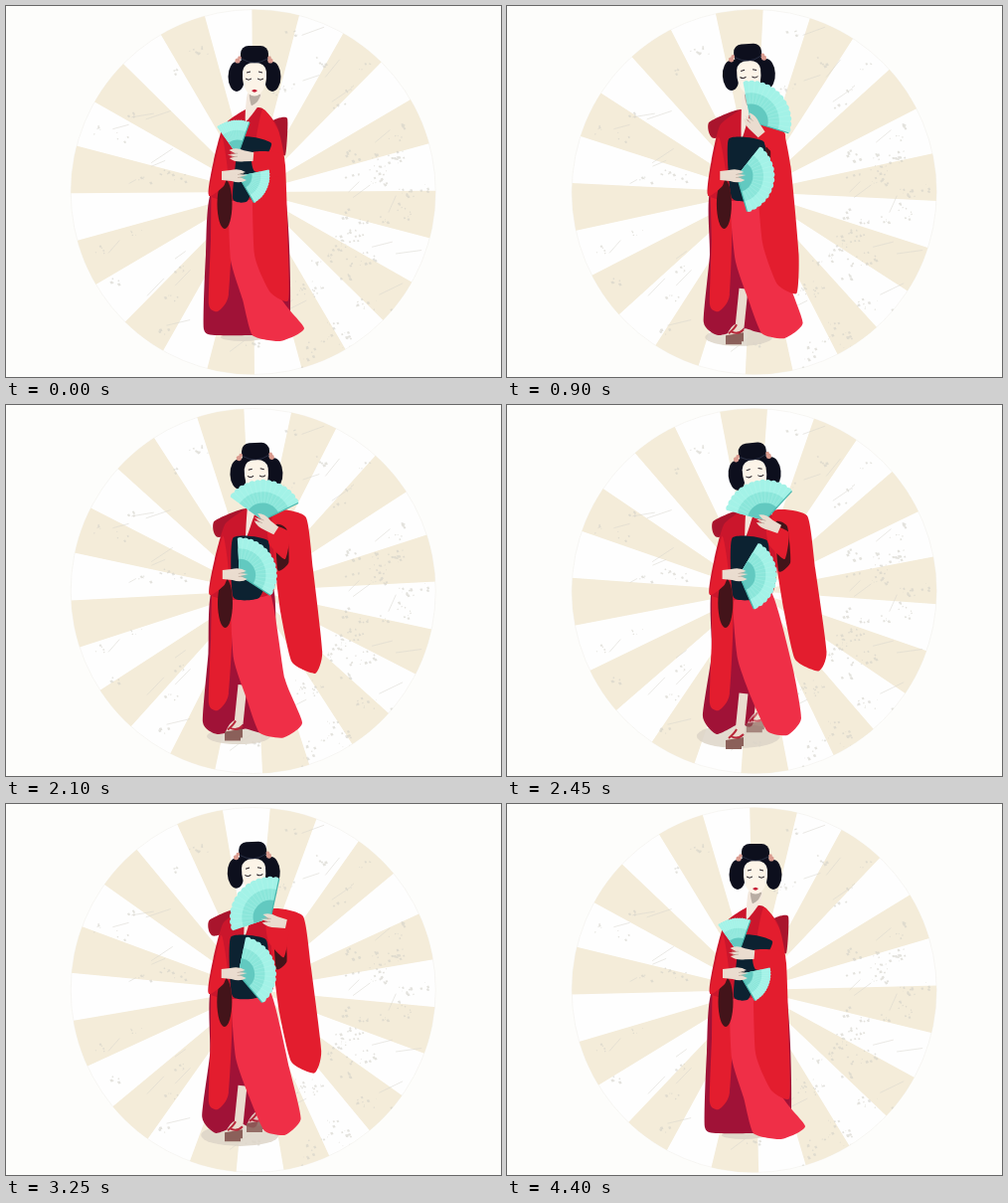
Animation, 498 px wide and 373 px high, one loop 4.45 s. Source, as an HTML page:

```html
<!DOCTYPE html>
<html lang="en">
<head>
<meta charset="utf-8">
<title>Fan dance</title>
<style>
  html, body { margin: 0; width: 100%; height: 100%; overflow: hidden; background: #fdfdfb; }
  svg { display: block; width: 100vw; height: 100vh; }
</style>
</head>
<body>
<svg viewBox="0 0 498 373">
  <defs>
    <clipPath id="disc"><circle cx="248.7" cy="187" r="183.5"/></clipPath>
  </defs>
  <circle cx="248.7" cy="187" r="183.5" fill="#fefefe" stroke="#f5f4f0" stroke-width=".8"/>
  <g clip-path="url(#disc)">
    <path id="rays" fill="#f4ecd9"/>
    <g id="wear"></g>
  </g>
  <g id="figure"></g>
</svg>
<script>
const LOOP = 4450, STEP = 50;
const CX = 248.7, CY = 187;
const RED = '#e31d2e', PINK = '#ef2f47', CRIMSON = '#a01237', WINE = '#a9152d';
const BROWN = '#43141a', NAVY = '#0c2231', SKIN = '#eadccf', HAIR = '#0d0f1d';

// The whole dance is steered by seven controls that pass through a few key poses.
const KEY_TIMES = [0, 900, 1500, 2100, 2800, 3750, 4400];
const CONTROLS = {
  lean: [0, -7, 9, 2, -3, 2, 0],
  open: [0, 1, 1, 1, 1, 1, 0],
  spread: [0, .25, .4, .9, 1, .65, 0],
  leftStep: [0, .6, 0, .5, 1, 0, 0],
  rightStep: [0, 0, 1, 0, .5, 0, 0],
  upperTilt: [-98, -42, -77, -85, -127, -142, -98],
  lowerTilt: [24, 11, -25, -30, 30, -63, 24]
};

const clamp = v => Math.max(0, Math.min(1, v));
const mix = (a, b, u) => a + (b - a) * u;
const num = v => v.toFixed(1);
const polar = (x, y, r, a) => [x + r * Math.cos(a), y + r * Math.sin(a)].map(num);

function follow(keys, t) {
  const last = KEY_TIMES.length - 1, time = Math.min(t, KEY_TIMES[last]);
  let k = 0;
  while (k < last - 1 && time >= KEY_TIMES[k + 1]) k++;
  const span = KEY_TIMES[k + 1] - KEY_TIMES[k];
  const u = (time - KEY_TIMES[k]) / span, ease = u * u * (3 - 2 * u);
  const slope = i => i === 0 || i === last ? 0 :
    .7 * (keys[i + 1] - keys[i - 1]) / (KEY_TIMES[i + 1] - KEY_TIMES[i - 1]);
  return mix(keys[k], keys[k + 1], ease) +
    span * u * (1 - u) * (slope(k) * (1 - u) - slope(k + 1) * u);
}

function poseAt(t) {
  const pose = {};
  for (const name in CONTROLS) pose[name] = follow(CONTROLS[name], t);
  pose.step = clamp(pose.leftStep + pose.rightStep);
  return pose;
}

// The body bends from the hips: the higher a point, the more it leans.
const sway = (x, y, pose) => x + pose.lean * clamp((240 - y) / 180);

const figure = document.getElementById('figure');
const updates = [];

function add(parent, tag, attrs, html = '') {
  const el = document.createElementNS('http://www.w3.org/2000/svg', tag);
  for (const name in attrs) el.setAttribute(name, attrs[name]);
  el.innerHTML = html;
  parent.appendChild(el);
  return el;
}

function smoothPath(points, bend = .09) {
  const at = i => points[(i + points.length) % points.length];
  let d = `M${points[0].map(num)}`;
  points.forEach((a, i) => {
    const p = at(i - 1), b = at(i + 1), q = at(i + 2);
    const c = a.map((v, j) => v + (b[j] - p[j]) * bend);
    const e = b.map((v, j) => v - (q[j] - a[j]) * bend);
    d += `C${[...c, ...e, ...b].map(num)}`;
  });
  return d + 'Z';
}

// An outline at rest that a control pulls towards its moved form.
function cloth(fill, control, rest, moved = rest) {
  const parse = s => s.split(' ').map(p => p.split(',').map(Number));
  const from = parse(rest), to = parse(moved), el = add(figure, 'path', { fill });
  updates.push(pose => el.setAttribute('d', smoothPath(from.map(([x, y], i) => {
    const px = mix(x, to[i][0], pose[control]), py = mix(y, to[i][1], pose[control]);
    return [sway(px, py, pose), py];
  }))));
}

function rigid(html, place) {
  const el = add(figure, 'g', {}, html);
  updates.push(pose => {
    const { x, y, turn = 0, alpha = 1 } = place(pose);
    el.setAttribute('transform', `translate(${num(sway(x, y, pose))} ${num(y)}) rotate(${num(turn)})`);
    el.setAttribute('opacity', clamp(alpha));
  });
}

function sector(x, y, r, from, to, bumps = 1) {
  const step = (to - from) / bumps, bow = bumps > 1 ? Math.abs(r * step) * .75 : r;
  let d = `M${num(x)},${num(y)}L${polar(x, y, r, from)}`;
  for (let i = 1; i <= bumps; i++) d += `A${num(bow)},${num(bow)} 0 0 1 ${polar(x, y, r, from + step * i)}`;
  return d + 'Z';
}

function fan(place) {
  const leaf = add(figure, 'path', { fill: '#a3f2e7' });
  const tint = add(figure, 'path', { fill: '#8be6da' });
  const core = add(figure, 'path', { fill: '#62c9c0' });
  const ribs = add(figure, 'path', { stroke: '#c9f9f2', 'stroke-width': .4, opacity: .5 });
  const guard = add(figure, 'path', { stroke: '#48b5ac', 'stroke-width': 1.2 });
  updates.push(pose => {
    const { x: px, y, r, tilt, span } = place(pose), x = sway(px, y, pose);
    const from = (tilt - span / 2) * Math.PI / 180, to = (tilt + span / 2) * Math.PI / 180;
    leaf.setAttribute('d', sector(x, y, r, from, to, 14));
    tint.setAttribute('d', sector(x, y, r * .72, from, to));
    core.setAttribute('d', sector(x, y, r * .44, from, to));
    let d = '';
    for (let i = 1; i < 14; i++) {
      const a = mix(from, to, i / 14);
      d += `M${polar(x, y, r * .45, a)}L${polar(x, y, r, a)}`;
    }
    ribs.setAttribute('d', d);
    guard.setAttribute('d', `M${num(x)},${num(y)}L${polar(x, y, r, to)}`);
  });
}

// Ground shadow
const shadow = add(figure, 'ellipse', { cy: 333, fill: '#ddd5c8', opacity: .85 });
updates.push(({ leftStep, rightStep, step }) => {
  shadow.setAttribute('cx', num(238 - 8 * leftStep + 6 * rightStep));
  shadow.setAttribute('rx', num(22 + 20 * step));
  shadow.setAttribute('ry', num(4 + 8 * step));
});

// Bow, then skirt lining
cloth(WINE, 'open', '268,116 283,113 281,150 270,140', '208,117 240,104 276,115 213,133');
cloth(CRIMSON, 'step',
  '208,185 201,250 199,325 214,331 247,331 285,330 279,185',
  '207,185 206,250 197,313 211,331 234,320 248,318 258,185');

const foot = `
  <path d="M5,-5L9,-44" stroke="${SKIN}" stroke-width="9"/>
  <path d="M-8,3Q-4,-7 2,-9L9,-5Q6,3 -8,4Z" fill="${SKIN}"/>
  <path d="M-9,3L9,0V9H7V12H-9Z" fill="#8b605a"/>
  <path d="M-6,1Q0,-4 2,-8M-4,-1Q3,3 9,-3" fill="none" stroke="#b8283a" stroke-width="2"/>`;
rigid(foot, ({ rightStep: s }) => ({ x: 246 + 17 * s, y: 314 + 14 * s, alpha: 3 * s }));
rigid(foot, ({ leftStep: s }) => ({ x: 229, y: 312 + 27 * s, alpha: 3 * s }));

// Left robe panel, front panel, bodice, right sleeve
cloth(RED, 'step', '208,165 206,235 204,300 213,307 224,290 228,190');
cloth(PINK, 'step',
  '226,190 226,255 238,295 248,331 276,337 300,324 274,288 264,190',
  '229,195 232,255 246,295 262,328 282,332 296,315 287,262 266,188');
cloth('#cb162c', 'open', '241,104 219,120 209,155 204,190 229,196 268,188 274,125 258,103');
cloth(RED, 'spread',
  '258,104 274,125 281,160 284,250 284,296 266,288 250,250 248,160',
  '268,107 303,111 311,165 322,248 314,267 290,255 279,205 272,160');

// Neck, obi, sleeve linings, forearms
cloth('#f3e8dd', 'open', '243,88 257,88 254,100 241,116', '243,88 257,88 248,112 240,134');
cloth('#b9aea4', 'open', '245,89 256,89 253,96 247,100');
cloth(NAVY, 'open',
  '236,133 267,138 255,165 243,196 228,193',
  '227,134 262,136 264,168 254,194 228,193');
cloth(BROWN, 'spread', '262,150 264,152 262,158 260,156', '271,118 283,122 286,158 274,167');
rigid(`<ellipse rx="7.5" ry="25" fill="${BROWN}"/>`, () => ({ x: 220, y: 199 }));
cloth(RED, 'open', '217,132 223,166 219,181 204,190');
cloth(RED, 'open', '248,147 276,148 280,172 250,166', '262,120 284,128 280,155 264,140');

// Head
rigid(`
  <g fill="${HAIR}">
    <ellipse cy="-5" rx="22" ry="13"/>
    <ellipse cx="-18" cy="1" rx="8.5" ry="15"/>
    <ellipse cx="18" cy="1" rx="8.5" ry="15"/>
    <rect x="-14" y="-30" width="28" height="19" rx="8"/>
  </g>
  <path d="M-12,-4Q-11,-13 0,-13Q11,-13 12,-4Q13,11 6,18Q0,23 -6,18Q-13,11 -12,-4Z" fill="#fcf4e8"/>
  <path d="M-13,-17Q0,-9 13,-17" fill="none" stroke="#30364c" stroke-width=".8"/>
  <g fill="#d99a8e">
    <circle cx="-17" cy="-15" r="2.6"/><circle cx="-15" cy="-18" r="1.8"/>
    <circle cx="16" cy="-15" r="2.6"/><circle cx="15" cy="-18" r="1.8"/>
  </g>
  <path d="M-9,3Q-6,5.5 -3,3M3,3Q6,5.5 9,3M-8,-3L-4,-4M4,-4L8,-3" fill="none" stroke="#29232a"/>
  <path d="M-3,15L0,13.8L3,15Q0,18.5 -3,15Z" fill="#c51c33"/>`,
  ({ leftStep, open }) => ({ x: 250, y: 70 - 2 * open, turn: -9 * leftStep ** 2 }));

// Fans and the hands that hold them
const upperFan = ({ open, upperTilt: tilt }) => ({
  x: mix(233, 256 - (tilt + 80) * .16, open), y: mix(150, 116, open),
  r: mix(35, 40, open), tilt, span: mix(56, 118, open)
});
const lowerFan = ({ open, lowerTilt: tilt }) => ({
  x: 234, y: 171, r: mix(31, 37, open), tilt, span: mix(72, 126, open)
});
fan(lowerFan);
fan(upperFan);

const hand = `
  <path d="M-12,-4Q-6,-8 3,-5L13,-4V5L4,6Q-5,8 -11,4L-5,2L-13,1L-5,-1Z" fill="${SKIN}"/>
  <path d="M-10,-1L-3,-1.5M-9,2.5L-3,1.5" stroke="#bba79a" stroke-width=".7"/>`;
rigid(hand, () => ({ x: 230, y: 171, turn: 180 }));
rigid(hand, pose => {
  const { x, y, tilt } = upperFan(pose);
  return { x: x + 3, y: y + 3 * pose.open, turn: mix(5, 35 + (tilt + 80) * .4, pose.open) };
});

// Worn print: clustered specks and hairline scratches, fixed in place
let seed = 17;
const random = () => (seed = seed * 16807 % 2147483647) / 2147483647;
const scatter = () => {
  const angle = random() < .6 ? random() * 1.9 - .5 : random() * 2 * Math.PI;
  return polar(CX, CY, 85 + random() * 97, angle).map(Number);
};
let specks = '', scratches = '';
for (let i = 0; i < 75; i++) {
  const [x, y] = scatter();
  for (let j = 0; j < 5; j++) {
    const size = .5 + random() * 2;
    specks += `M${num(x + random() * 14)},${num(y + random() * 9)}l${num(size)},-.7 ${num(size * .5)},${num(size)} -${num(size)},.6Z`;
  }
}
for (let i = 0; i < 26; i++) {
  const at = polar(CX, CY, 95 + random() * 75, random() * 2 * Math.PI);
  scratches += `M${at}l${num(6 + random() * 20)},${num(-3 - random() * 16)}`;
}
const wear = document.getElementById('wear');
add(wear, 'path', { d: specks, fill: '#d3d0c8', opacity: .6 });
add(wear, 'path', { d: scratches, stroke: '#d9d6cf', 'stroke-width': .8, opacity: .65 });

const rays = document.getElementById('rays');
let rayPath = '';
for (let i = 0; i < 12; i++) rayPath += sector(CX, CY, 190, i * Math.PI / 6, (i + .5) * Math.PI / 6);
rays.setAttribute('d', rayPath);

function render(t) {
  rays.setAttribute('transform', `rotate(${90 * t / LOOP - .4} ${CX} ${CY})`);
  const pose = poseAt(t);
  updates.forEach(update => update(pose));
}

const start = performance.now();
function tick() {
  const t = (performance.now() - start) % LOOP;
  render(Math.floor(t / STEP) * STEP);
  requestAnimationFrame(tick);
}
tick();
</script>
</body>
</html>
```
